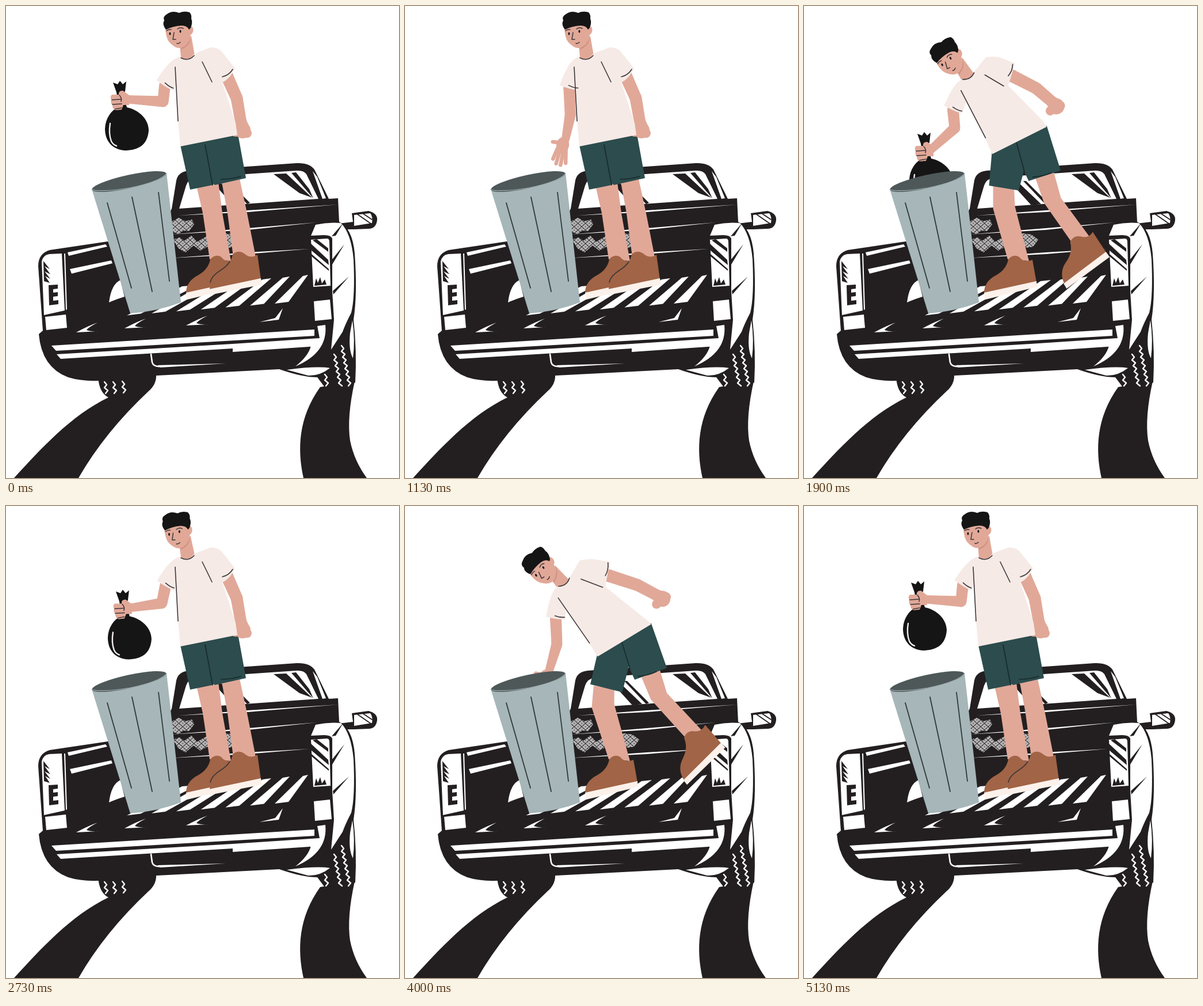
Animation of 683 by 820 pixels, one loop 5160 ms. Source, as an HTML page with a canvas:

```html
<!DOCTYPE html>
<html lang="en">
<head>
<meta charset="utf-8">
<title>Taking out the trash</title>
<style>
  html, body { margin: 0; width: 100%; height: 100%; overflow: hidden; background: #fff; }
  canvas { display: block; }
</style>
</head>
<body>
<canvas id="stage" width="683" height="820"></canvas>
<script>
const ctx = document.getElementById('stage').getContext('2d');
const INK = '#231f20', WHITE = '#fff', SKIN = '#e1a898', SHIRT = '#f6eae6', SHORTS = '#2c4c4d',
      SHOE = '#a16446', SOLE = '#fcf1eb', DARK = '#151516', LINE = '#3b3638';
const LOOP = 5160, CYCLE = LOOP / 2;
ctx.lineCap = ctx.lineJoin = 'round';

const fill = (color, ...paths) => {
  ctx.fillStyle = color;
  for (const d of paths) ctx.fill(new Path2D(d));
};
const line = (color, width, ...paths) => {
  ctx.strokeStyle = color;
  ctx.lineWidth = width;
  for (const d of paths) ctx.stroke(new Path2D(d));
};
const dot = (color, x, y, rx, ry = rx, angle = 0) => {
  ctx.fillStyle = color;
  ctx.beginPath();
  ctx.ellipse(x, y, rx, ry, angle, 0, 7);
  ctx.fill();
};
// Draws a group rotated about (px, py), then moved by (dx, dy).
function group(px, py, degrees, dx, dy, draw) {
  ctx.save();
  ctx.translate(px + dx, py + dy);
  ctx.rotate(degrees * Math.PI / 180);
  ctx.translate(-px, -py);
  draw();
  ctx.restore();
}
// Blends two paths of the same structure.
function mix(a, b, k) {
  const number = /-?[\d.]+/g, ends = b.match(number);
  let i = 0;
  return a.replace(number, n => (+n + (ends[i++] - n) * k).toFixed(2));
}
// Tapered limb through joints [x, y, radius].
function limb(joints) {
  joints.forEach(([x, y, r], i) => {
    dot(SKIN, x, y, r);
    if (!i) return;
    const [px, py, pr] = joints[i - 1], d = Math.hypot(x - px, y - py) || 1;
    const nx = (py - y) / d, ny = (x - px) / d;
    fill(SKIN, `M${px + nx * pr} ${py + ny * pr}L${x + nx * r} ${y + ny * r}L${x - nx * r} ${y - ny * r}L${px - nx * pr} ${py - ny * pr}Z`);
  });
}
const smooth = (a, b, t) => {
  const k = Math.min(1, Math.max(0, (t - a) / (b - a)));
  return k * k * (3 - 2 * k);
};

// time, sleeve end, elbow, wrist
const ARM = [
  [0, 276, 138, 273, 166, 208, 162],
  [150, 277, 138, 271, 168, 212, 174],
  [230, 278, 140, 271, 172, 217, 190],
  [720, 285, 143, 281, 187, 260, 224],
  [1130, 285, 143, 287, 190, 279, 232],
  [1420, 262, 195, 264, 240, 250, 288],
  [1680, 248, 213, 245, 270, 235, 335],
  [1910, 259, 180, 262, 212, 219, 251],
  [2250, 276, 138, 272, 168, 211, 172],
  [2580, 276, 138, 273, 166, 208, 162]
];
function armAt(t) {
  let i = 0;
  while (i < ARM.length - 2 && t >= ARM[i + 1][0]) i++;
  const a = ARM[i], b = ARM[i + 1], span = b[0] - a[0], k = (t - a[0]) / span;
  const slope = (n, c) => n < 1 || n > ARM.length - 2 ? 0
    : (ARM[n + 1][c] - ARM[n - 1][c]) / (ARM[n + 1][0] - ARM[n - 1][0]);
  return [1, 2, 3, 4, 5, 6].map(c => {
    const m0 = slope(i, c) * span, m1 = slope(i + 1, c) * span, d = b[c] - a[c];
    return a[c] + k * (m0 + k * (3 * d - 2 * m0 - m1 + k * (m0 + m1 - 2 * d)));
  });
}

function zigzag(x, y, bottom) {
  let d = `M${x} ${y}`;
  for (let i = 1; y + i * 5 <= bottom; i++) d += `L${x + i + (i % 2 ? 3 : -2)} ${y + i * 5}`;
  line(WHITE, 2.4, d);
}
function swoosh(x, y) {
  fill(WHITE, `M${x} ${y}Q${x + 20} ${y - 11} ${x + 37} ${y - 17}Q${x + 20} ${y - 8} ${x + 18} ${y - 4}Q${x + 26} ${y - 1} ${x + 39} ${y - 2}Z`);
}
function mesh(outline) {
  ctx.save();
  ctx.clip(new Path2D(outline));
  for (let x = 200; x < 500; x += 6.5) line('#b3b1b2', 3, `M${x} 360l80 72`, `M${x} 360l-80 72`);
  for (let x = 203; x < 500; x += 13) line(INK, 1, `M${x} 360l80 72`, `M${x} 360l-80 72`);
  ctx.restore();
}

function truck() {
  fill(INK,
    'M14 820C60 770 112 712 178 680Q162 672 160 645L261 640Q262 657 248 669Q172 740 126 820Z',
    'M517 820C506 770 508 715 546 662L606 652Q592 715 598 755Q605 790 627 820Z',
    'M57 570L64 564L56 452Q56 430 76 424L177 409L278 372L288 352L296 303Q299 288 318 286L505 273Q527 272 536 284L561 335L577 334L579 375Q602 386 606 430Q611 500 604 545Q610 600 607 654Q590 664 553 661L541 645Q515 645 475 631L262 642L160 651Q130 652 108 645Q62 628 57 570Z',
    'M578 378L603 375L601 360L630 356Q646 360 645 372Q643 387 630 387L605 388L579 388Z');

  // Cab
  fill(WHITE,
    'M301 352L313 312Q317 300 330 298L505 286Q517 285 522 292L543 335Z',
    'M533 287L541 297L556 334L550 335Z',
    'M605 363L633 360Q638 366 636 377L605 382Z');
  fill(INK, 'M465 292L487 291L532 333L510 325Z', 'M496 290L504 289L527 318L534 334Z',
    'M364 312L372 306L412 344L395 346Z', 'M381 304L386 304L424 342L419 344Z');
  line(INK, 1.8, 'M611 362L634 378', 'M621 361L636 371');
  fill(WHITE, 'M300 364L420 355L577 345L420 358Z', 'M285 397L420 386L540 376L420 389Z', 'M285 438L420 428L527 422L420 431Z');
  mesh('M278 380L300 368L312 374L323 371L327 379L318 391L308 390L300 396L280 389Z');
  mesh('M290 406L302 402L310 408L322 399L332 410L352 398L365 402L380 395L395 397L407 406L398 418L386 420L372 414L362 425L350 418L338 425L326 416L312 428L300 421Z');

  // Right side
  fill(WHITE,
    'M538 380Q560 375 582 377Q600 395 604 440Q607 505 600 533Q590 552 585 566L565 597L570 545L567 495L567 404Q565 398 553 398L530 399Z',
    'M602 546Q607 580 603 612Q595 598 598 568Z',
    'M535 513L563 510L566 544L537 547Z',
    'M530 406L558 404Q562 404 562 410L564 486L534 488Z');
  fill(INK, 'M586 377L566 400L573 399Z', 'M567 440L588 414L567 449Z', 'M568 495L596 470L569 501Z',
    'M530 413L560 441L561 450L530 424Z', 'M530 430L561 457L561 460L530 434Z', 'M540 405L560 421L560 427L533 407Z',
    'M536 486L539 473L542 481L546 471L549 482L554 475L557 484Z');

  // Left light
  fill(WHITE, 'M62 444Q64 433 75 431L97 430L102 529L66 537Z', 'M101 430L103 430L106 527L104 528Z',
    'M68 540L104 536L106 559L70 563Z');
  fill(INK, 'M65 443L76 457L67 452L77 466L67 461L77 474L68 469L76 481L66 478Z',
    'M74 485L90 484L90 491L82 492L82 498L90 497L90 504L82 505L82 512L91 511L91 518L75 520Z');

  // Bed
  fill(WHITE, 'M107 428L173 414L176 418L109 434Z', 'M111 457L183 442L185 447L114 465Z',
    'M179 515Q183 483 199 476L206 505Q190 510 179 515Z',
    'M441 549L468 542L481 525L474 545Z');
  swoosh(122, 567); swoosh(206, 560); swoosh(313, 555);
  for (let i = 0; i < 7; i++) {
    const x = 467 - 42.8 * i, y = 517 + 3.4 * i, left = 516 - 35 * i, top = 467 + 3 * i;
    fill(WHITE, `M${left} ${top + 2}L${left + 9 + 3 * i} ${top}L${x + 24} ${y - 3}L${x} ${y}Z`);
  }

  // Bumper
  fill(WHITE, 'M79 590L536 562L536 573L87 599Z', 'M88 605L394 587L394 595L95 613Z',
    'M394 587L545 577L541 591L394 601Z',
    'M541 556L555 554Q560 602 503 626Q526 608 530 590L545 577Z',
    'M488 632Q540 625 563 629Q545 643 525 642Z');
  line(WHITE, 2.6, 'M252 605L254 619Q256 627 268 626');
  fill(WHITE, 'M264 624L382 621L268 628Z');
  zigzag(171, 653, 676); zigzag(186, 653, 676); zigzag(202, 652, 676);
  zigzag(554, 640, 660); zigzag(570, 605, 660); zigzag(583, 590, 660);
}

function bag(dx, dy) {
  group(0, 0, 0, dx, dy, () => {
    fill(DARK, 'M186 133L194 136L198 130L203 136L209 131L207 148L204 154L210 176C230 180 248 196 248 216C246 242 230 250 208 251C184 250 172 234 172 213C173 195 182 182 196 175L192 150Z');
    line('#f4efed', 2.4, 'M181 204Q178 222 183 235Q186 241 192 243');
  });
}
function fist(dx, dy) {
  group(0, 0, 0, dx, dy, () => {
    fill(SKIN, 'M214 155L203 147Q195 147 196 154L184 154Q180 158 183 163Q181 168 185 172Q185 180 191 181L201 180L204 172L214 172Z');
    line(LINE, 1.5, 'M184 163L200 162', 'M185 171L201 170', 'M190 179L201 177', 'M197 155Q202 160 200 166');
  });
}
function openHand(x, y, angle) {
  ctx.save();
  ctx.translate(x, y);
  ctx.rotate(angle);
  dot(SKIN, 11, 3, 14, 11);
  line(SKIN, 6.5, 'M8 8L9 21', 'M20 11L38 15', 'M20 6L45 8', 'M20 0L46 0', 'M18 -4L41 -8');
  ctx.restore();
}

function head(lean, nod) {
  group(316, 86, -33 * lean + nod, -40 * lean, 47 * lean, () => {
    fill(SKIN, 'M302 66L322 52L328 86Q317 99 304 90Z',
      'M277 34Q277 55 284 63Q294 74 303 73Q317 69 321 50Q327 46 325 38L318 30Z');
    fill('#cf9182', 'M304 73Q316 69 321 55Q320 69 304 76Z');
    fill(DARK, 'M278 41Q271 32 275 25Q272 18 280 14Q289 7 301 12Q309 8 319 11Q323 15 322 22Q325 28 321 38L318 41Q315 34 305 34Q290 35 278 41Z');
    line(LINE, 1.5, 'M279 43Q283 40 287 41', 'M298 40Q303 36 308 39', 'M292 46L290 58L295 58', 'M297 65Q300 66 303 63');
    dot(DARK, 285, 48, 1.5, 2.5);
    dot(DARK, 303, 44, 1.5, 2.5);
  });
}

function legs(lean) {
  fill(SKIN, mix('M331 312L369 306L376 360L391 443L354 440L342 360Z', 'M328 312L364 318L364 345L391 443L354 440L325 350Z', lean));
  fill(SHOE, 'M313 498Q313 478 335 467Q352 457 355 440Q364 430 374 436Q382 447 397 441L404 480L314 500Z');
  fill(SOLE, 'M313 498L404 478L405 488L315 510Z');
  fill(SKIN, mix('M375 306L406 300L419 360L434 436L395 436L385 360Z', 'M410 298L442 286L454 326L514 392L485 404L426 337Z', lean));
  group(415, 435, -32 * lean, 87 * lean, -39 * lean, () => {
    fill(SHOE, 'M354 492Q354 470 374 459Q391 449 394 431Q404 423 414 430Q425 440 437 432L443 475L354 494Z');
    fill(SOLE, 'M353 492L443 473L445 484L354 502Z');
    if (lean < .05) line(LINE, 1.6, 'M355 480Q357 469 373 459Q384 452 389 444');
  });
  fill(SHORTS, mix('M303 242L403 222L417 299L363 311L361 309L359 311L320 319Z', 'M333 258L427 204L454 282L398 302L388 280L377 323L322 310Z', lean));
  line('#18292b', 1.6, mix('M346 241L359 311', 'M376 237L390 283', lean), mix('M374 301Q392 301 408 296', 'M404 296Q421 295 436 288', lean));
}

function rightArm(lean) {
  const at = (x, y, x2, y2, r) => [x + (x2 - x) * lean, y + (y2 - y) * lean, r];
  limb([at(384, 122, 355, 121, 11), at(401, 160, 404, 138, 10.5), at(408, 200, 436, 156, 10), at(411, 216, 446, 163, 14)]);
  dot(SKIN, ...at(399, 219, 436, 172, 8));
  dot(SKIN, ...at(419, 221, 453, 160, 8));
}

function man(t, lean) {
  const [sx, sy, ex, ey, wx, wy] = armAt(t);
  const holding = t < 190 || t > 1680;
  const jx = 295 - 27 * lean, jy = 108 + 50 * lean;
  legs(lean);
  rightArm(lean);
  head(lean, -2.3 * smooth(0, 150, t) * (1 - smooth(800, 1100, t)));

  if (holding) bag(wx - 208, wy - 162);
  else if (t < 350) bag(4, 13 + .006 * (t - 150) ** 2);
  limb([[jx, jy, 11], [sx, sy, 10], [ex, ey, 9.5], [wx, wy, 7]]);
  if (holding) fist(wx - 208, wy - 162);
  else openHand(wx, wy, Math.atan2(wy - ey, wx - ex));

  fill(SHIRT, mix(
    'M303 88Q293 92 293 106L299 200L303 244L402 224L399 203L376 133Q390 126 398 108L374 78Q366 71 355 72L327 83Q317 98 303 88Z',
    'M267 138Q262 145 266 157L319 237L334 261L427 206L419 198L349 140Q353 118 358 97L330 92Q318 91 305 94L288 122Q284 136 267 138Z', lean));

  // Left sleeve follows the upper arm.
  const d = Math.hypot(sx - jx, sy - jy), ux = (sx - jx) / d, uy = (sy - jy) / d;
  const across = (k, back) => `${sx + uy * k - ux * back} ${sy - ux * k - uy * back}`;
  const neck = [303 - 36 * lean, 88 + 50 * lean], shoulder = [285 - 31 * lean, 91 + 53 * lean];
  fill(SHIRT, `M${neck}Q${shoulder} ${across(-17, 0)}Q${across(0, -2)} ${across(17, 0)}L${jx + 12} ${jy + 8}Z`);
  line(LINE, 1.6, `M${across(-2, 4)}Q${across(8, 2)} ${across(15, 4)}`,
    mix('M294 106L299 200', 'M267 158L320 237', lean),
    mix('M341 97L358 132', 'M307 126L344 141', lean),
    mix('M376 123Q388 120 394 110', 'M349 121Q355 112 354 99', lean),
    mix('M304 90Q317 97 327 86', 'M268 138Q283 137 287 124', lean));
}

function can(tilt) {
  group(304, 515, tilt, 0, 0, () => {
    fill('#a6b6b9', 'M149 318L216 534Q262 531 304 515L279 290Z');
    dot('#4e5859', 214, 305, 66, 11.5, -.215);
    line('#a6b6b9', 1.2, 'M149 319Q165 324 215 316Q268 305 279 291');
    line('#30393a', 1.8, 'M176 342L218 490', 'M219 332L254 496', 'M265 324L284 478');
  });
}

// The pose is held for about 70 ms, counted from each beat.
const BEATS = [100, 630, 1200, 1770, 2330, 2900, 3430, 4000, 4570, 5130];
function draw(now) {
  const time = now % LOOP, start = BEATS.findLast(b => b <= time);
  const held = start === undefined ? 0 : start + Math.floor((time - start + 20) / 70) * 70;
  const t = held % CYCLE;
  const lean = t < 1130 || t > 2050 ? 0
    : 1.4 * (t < 1680 ? Math.sin((t - 1130) / 550 * Math.PI / 2) : Math.cos((t - 1680) / 370 * Math.PI / 2));
  const tilt = t > 430 && t < 930 ? -3.6 * Math.sin((t - 430) / 500 * Math.PI) : 0;
  ctx.fillStyle = WHITE;
  ctx.fillRect(0, 0, 683, 820);
  truck();
  man(t, lean);
  can(tilt);
}
const origin = performance.now();
function tick() {
  draw(performance.now() - origin);
  requestAnimationFrame(tick);
}
tick();
</script>
</body>
</html>
```
